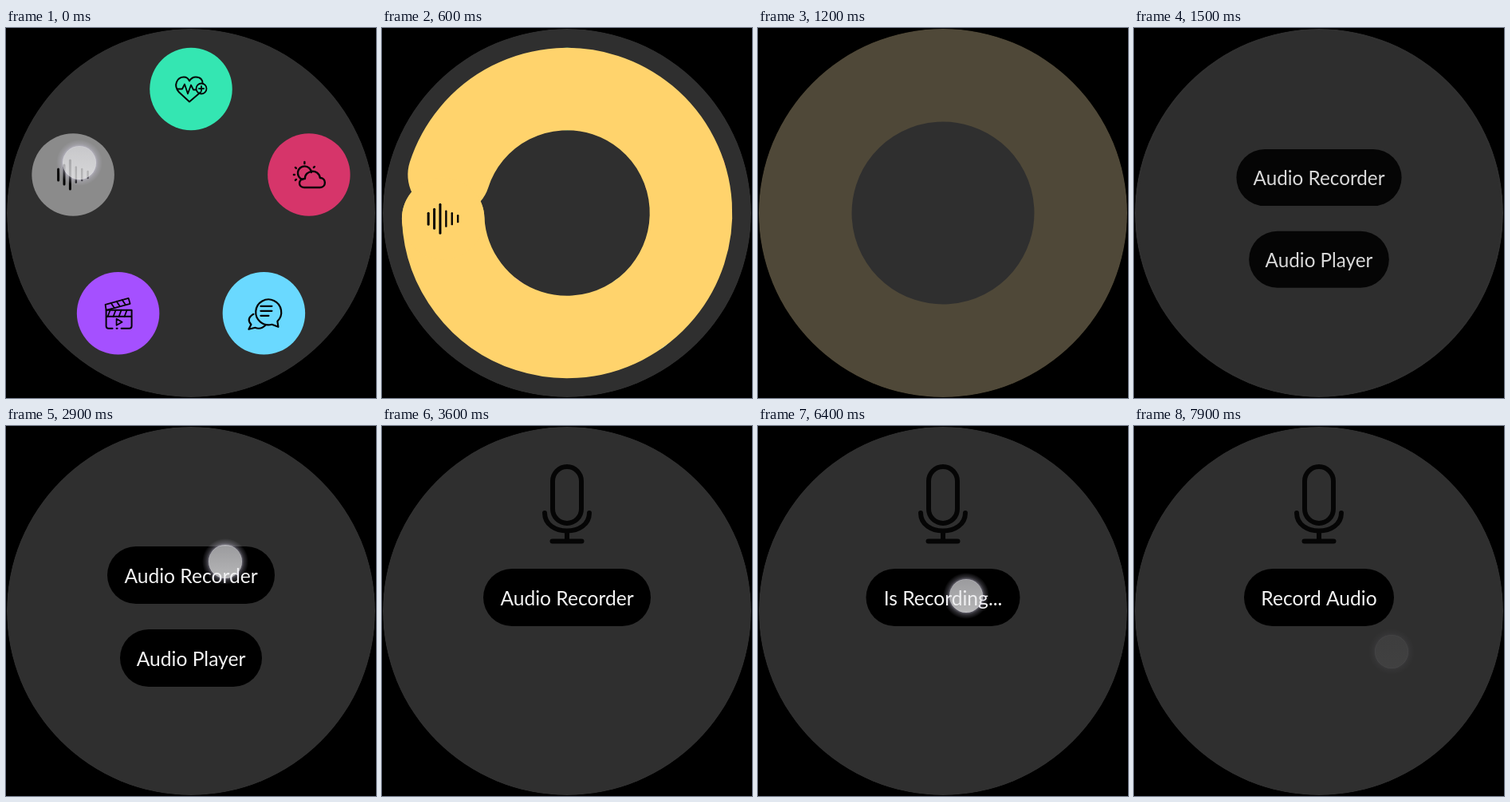
An HTML page with a canvas that plays this animation: 464 by 464 pixels, repeating every 8000 ms.

```html
<!DOCTYPE html>
<html lang="en">
<head>
<meta charset="utf-8">
<title>Watch menu</title>
<style>
  html, body { margin: 0; width: 100%; height: 100%; overflow: hidden; background: #000; }
  canvas { display: block; width: 464px; height: 464px; }
</style>
</head>
<body>
<canvas id="stage" width="464" height="464"></canvas>
<script>
const ctx = document.getElementById('stage').getContext('2d');
const LOOP = 8000, TICK = 100, C = 232, TAU = Math.PI * 2;
const FACE = '#2f2f2f', GOLD = '255,211,108';
const ORBIT = 155.5, BUTTON = 51.75;
const START = 198 * Math.PI / 180;

const clamp = v => Math.max(0, Math.min(1, v));
const progress = (t, from, to) => clamp((t - from) / (to - from));
const easeOut = u => 1 - (1 - u) ** 2;
const easeInOut = u => u * u * (3 - 2 * u);

function disc(x, y, r, fill) {
  ctx.fillStyle = fill;
  ctx.beginPath();
  ctx.arc(x, y, r, 0, TAU);
  ctx.fill();
}

// Draws an SVG path as a round-ended black line.
function line(path, width = 2) {
  ctx.strokeStyle = '#050505';
  ctx.lineWidth = width;
  ctx.lineCap = ctx.lineJoin = 'round';
  ctx.stroke(new Path2D(path));
}

// Icons are drawn around the centre of their button.
function heartIcon() {
  line('M12 4 L-2 16 L-15 4 C-23 -5 -17 -15 -9 -15 Q-4 -15 -2 -10 Q1 -15 6 -15 C12 -15 15 -11 14.5 -7');
  line('M-17 0 H-11 L-8 -6 L-4 6 L0 -5 L3 1 H6', 1.8);
  line('M6.5 -.5 a6.5 6.5 0 1 0 13 0 a6.5 6.5 0 1 0 -13 0 M10 -.5 H16 M13 -3.5 V2.5', 1.8);
}

function weatherIcon() {
  line('M-8 6 A8.5 8.5 0 1 1 3 -3 M-5.5 -16 V-14 M-17 -9 L-16 -8 M6 -9 L7 -10 M-19 0 H-18 M-17 7 L-16 6', 2.4);
  line('M-6 16 C-14 16 -14 5 -5 5 C-5 -6 12 -8 14 4 C22 4 22 16 14 16 Z', 2.4);
}

function chatIcon() {
  line('M17 10 L18 17 L10 14 A16 16 0 1 1 17 10 Z M-4 -9 H10 M-4 -3 H10 M-4 3 H6', 2.2);
  line('M-13 1 C-20 5 -20 10 -16 14 L-19 20 L-11 18 C-6 20 -1 18 2 15', 2.2);
}

function movieIcon() {
  line('M-15 -4 H17 V16 Q17 19 14 19 H4 M-1 19 H-2 M-7 19 H-12 Q-15 19 -15 16 V-4 M-15 4 H17');
  line('M-10 -4 L-13 4 M-3 -4 L-6 4 M4 -4 L1 4 M11 -4 L8 4 M-2 7 V15 L5 11 Z', 1.8);
  line('M-15 -4 L-16 -11 L13 -19 L15 -12 Z M-9 -13 L-5 -7 M-2 -15 L2 -9 M5 -17 L9 -11', 1.8);
}

function soundIcon() {
  [8, 13, 19, 10.5, 8, 5].forEach((h, i) => {
    const x = -18.5 + i * 7.4;
    line(`M${x} ${-h + 1} V${h - 1}`, i < 3 ? 3 : 2.4);
  });
}

const items = [
  ['#34e6b2', heartIcon],
  ['#d6356a', weatherIcon],
  ['#6ad9ff', chatIcon],
  ['#a550ff', movieIcon]
];

function menuButton(angle, color, icon) {
  ctx.save();
  ctx.translate(C + ORBIT * Math.cos(angle), C + ORBIT * Math.sin(angle));
  disc(0, 0, BUTTON, color);
  icon();
  ctx.restore();
}

function ring(inner, outer, alpha, sweep) {
  ctx.strokeStyle = `rgba(${GOLD},${alpha})`;
  ctx.lineWidth = outer - inner;
  ctx.lineCap = sweep < TAU ? 'round' : 'butt';
  ctx.beginPath();
  ctx.arc(C, C, (inner + outer) / 2, START, START + sweep);
  ctx.stroke();
}

function menuPage(t) {
  const sweep = TAU * easeInOut(progress(t, 130, 680));
  if (sweep < TAU) {
    items.forEach(([color, icon], i) => menuButton((i * 72 - 90) * Math.PI / 180, color, icon));
    if (sweep > 0) ring(ORBIT - BUTTON, ORBIT + BUTTON, 1, sweep);
    menuButton(START + sweep, t < 200 ? '#8b8b8b' : `rgb(${GOLD})`, soundIcon);
  } else {
    const grow = easeOut(progress(t, 680, 1536));
    ring(103.8 + 12.6 * grow, 207.3 + 39.4 * grow, 1 - grow, TAU);
  }
}

function pill(label, y, width) {
  ctx.fillStyle = '#000';
  ctx.beginPath();
  ctx.roundRect(C - width / 2, y, width, 72, 36);
  ctx.fill();
  ctx.fillStyle = '#f4f4f4';
  ctx.font = '24.6px Lato, "Open Sans", sans-serif';
  ctx.textAlign = 'center';
  ctx.fillText(label, C, y + 46);
}

function audioPage() {
  pill('Audio Recorder', 151, 210);
  pill('Audio Player', 255, 178);
}

function recorderPage(t) {
  line('M214 69 A18 18 0 0 1 250 69 V104 A18 18 0 0 1 214 104 Z', 6);
  line('M204 109 C204 139 260 139 260 109 M232 133 V144 M213.5 144.5 H250.5', 6);
  if (t < 4700) pill('Audio Recorder', 179, 210);
  else if (t < 6600) pill('Is Recording...', 179, 193);
  else pill('Record Audio', 179, 188);
}

function face(page, t) {
  disc(C, C, 231, FACE);
  page(t);
}

// The next page fades in while growing to full size.
function enterPage(page, t, from, to) {
  const u = easeOut(progress(t, from, to));
  if (u === 0) return;
  const scale = 0.88 + 0.12 * u;
  ctx.save();
  ctx.globalAlpha = u;
  ctx.translate(C, C);
  ctx.scale(scale, scale);
  ctx.translate(-C, -C);
  face(page, t);
  ctx.restore();
}

function touch(x, y, alpha) {
  if (alpha <= 0) return;
  ctx.save();
  ctx.globalAlpha = alpha;
  const glow = ctx.createRadialGradient(x, y, 20, x, y, 29);
  glow.addColorStop(0, 'rgba(225,220,245,.5)');
  glow.addColorStop(0.4, 'rgba(225,220,245,.2)');
  glow.addColorStop(1, 'rgba(225,220,245,0)');
  ctx.fillStyle = glow;
  ctx.beginPath();
  ctx.arc(x, y, 29, 0, TAU);
  ctx.arc(x, y, 20.5, 0, TAU, true);
  ctx.fill();
  const core = ctx.createLinearGradient(0, y - 21, 0, y + 21);
  core.addColorStop(0, 'rgba(228,228,232,.68)');
  core.addColorStop(1, 'rgba(240,240,242,.76)');
  disc(x, y, 21, core);
  ctx.restore();
}

const taps = [
  [0, 300, 92, 169],
  [2900, 3200, 275, 170],
  [4500, 4900, 262, 214],
  [6400, 6700, 261, 213]
];

function drawTouches(t) {
  for (const [from, to, x, y] of taps) {
    if (t >= from && t < to) touch(x, y, 1 - progress(t, from, to));
  }
  if (t >= 7600) {
    const u = progress(t, 7600, 7900);
    touch(38 + 285 * u, 270 + 13 * u, t < 7900 ? 1 : 0.12);
  }
}

function draw(t) {
  ctx.fillStyle = '#000';
  ctx.fillRect(0, 0, 464, 464);
  ctx.save();
  ctx.beginPath();
  ctx.arc(C, C, 231, 0, TAU);
  ctx.clip();
  if (t < 1600) {
    face(menuPage, t);
    enterPage(audioPage, t, 1300, 1600);
  } else if (t < 3600) {
    face(audioPage, t);
    enterPage(recorderPage, t, 3100, 3600);
  } else {
    face(recorderPage, t);
  }
  drawTouches(t);
  ctx.restore();
}

const begin = performance.now();
function frame() {
  const t = (performance.now() - begin) % LOOP;
  draw(Math.floor(t / TICK) * TICK);
  requestAnimationFrame(frame);
}
frame();
</script>
</body>
</html>
```
